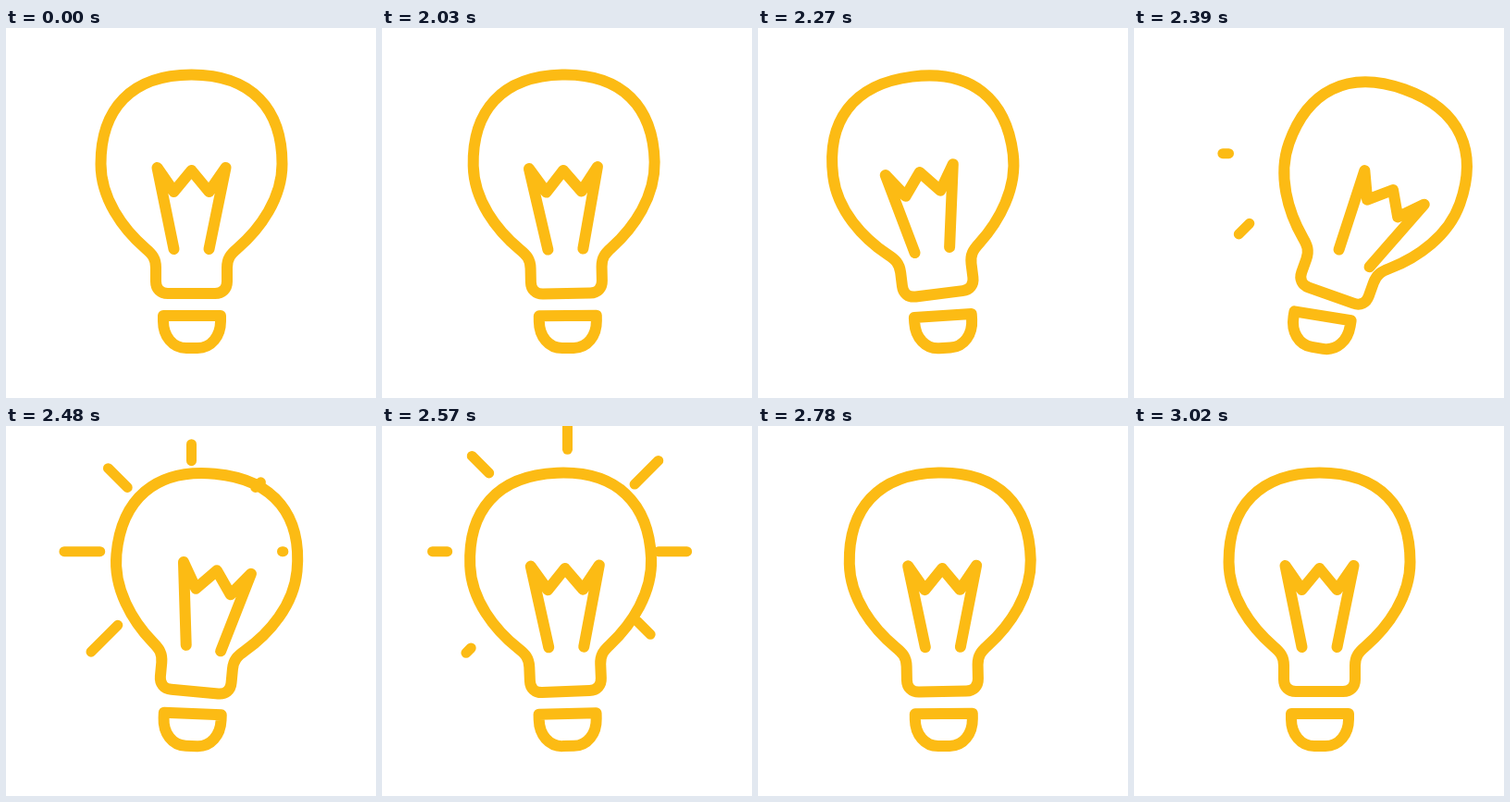
An HTML page that plays this animation: 400x400 px, repeating every 3050 ms.

```html
<!DOCTYPE html>
<html lang="en">
<head>
<meta charset="utf-8">
<title>Light bulb</title>
<style>
  html, body { margin: 0; width: 100%; height: 100%; overflow: hidden; background: #fff; }
  svg { display: block; width: 100vw; height: 100vh; }
  g { fill: none; stroke: #fcbb14; stroke-width: 12; stroke-linecap: round; stroke-linejoin: round; }
  #rays { stroke-width: 11; }
</style>
</head>
<body>
<svg viewBox="0 0 400 400">
  <g>
    <path id="glass" d="M200.5 50.5C135 50.5 102.5 88 102.5 147C102.5 184 126 217 151 238.5C158 244.5 162 249 162 259V274C162 282 167 287 175 287H226C234 287 239 282 239 274V259C239 249 243 244.5 250 238.5C275 217 298.5 184 298.5 147C298.5 88 266 50.5 200.5 50.5Z"/>
    <path id="wire" d="M181.5 239L163.5 151L181.5 177L200.5 154L219.5 177L237.5 151L219.5 239"/>
    <path id="cap" d="M170 311H232V317C232 333 222 346 207 346H195C180 346 170 333 170 317Z"/>
  </g>
  <g id="rays"></g>
</svg>
<script>
const LOOP = 3050, HOLD = 2030, STEP = 30;
const RAY_LENGTH = 48;

const clamp = u => Math.min(1, Math.max(0, u));
const smooth = u => { u = clamp(u); return u * u * (3 - 2 * u); };
const easeOut = u => Math.sin(clamp(u) * Math.PI / 2);

// Tilt in degrees at each of the key steps: wind up, swing, rebound, rest.
const keySteps = [-1, 8, 12, 17, 33];
const parts = [
  { id: "glass", pivot: 325, tilt: [0, -7.1, 19.5, -2.4, 0] },
  { id: "wire", pivot: 315, tilt: [0, -9.2, 29.6, -0.95, 0] },
  { id: "cap", pivot: 330, tilt: [0, -3.6, 9.2, -1.3, 0] }
];
for (const part of parts) part.el = document.getElementById(part.id);

function tiltAt(tilt, step) {
  let i = 0;
  while (i < keySteps.length - 2 && step > keySteps[i + 1]) i++;
  const u = (step - keySteps[i]) / (keySteps[i + 1] - keySteps[i]);
  const ease = i === 0 ? easeOut : smooth;
  return tilt[i] + (tilt[i + 1] - tilt[i]) * ease(u);
}

// Seven rays, clockwise from the lower left.
const rays = Array.from({ length: 7 }, (_, i) => {
  const angle = (135 + 45 * i) * Math.PI / 180;
  const el = document.createElementNS("http://www.w3.org/2000/svg", "line");
  document.getElementById("rays").append(el);
  return { el, x: Math.cos(angle), y: Math.sin(angle), inner: i % 6 ? 98 : 107 };
});

function drawRay(ray, i, step) {
  const head = smooth((step - 9.65 - 0.95 * i) / 6);
  const tail = smooth((step - 13.8 - 0.78 * i) / 5.6);
  const shown = head > 0.02 && tail < 1;
  ray.el.style.display = shown ? "" : "none";
  if (!shown) return;
  [tail, head].forEach((part, end) => {
    const r = ray.inner + RAY_LENGTH * part;
    ray.el.setAttribute("x" + (end + 1), 200.5 + ray.x * r);
    ray.el.setAttribute("y" + (end + 1), 135.7 + ray.y * r);
  });
}

function draw(time) {
  const step = Math.max(-1, Math.floor((time % LOOP - HOLD) / STEP));
  for (const { el, pivot, tilt } of parts) {
    el.setAttribute("transform", `rotate(${tiltAt(tilt, step)} 200.5 ${pivot})`);
  }
  rays.forEach((ray, i) => drawRay(ray, i, step));
}

const start = performance.now();
function tick() {
  draw(performance.now() - start);
  requestAnimationFrame(tick);
}
tick();
</script>
</body>
</html>
```
